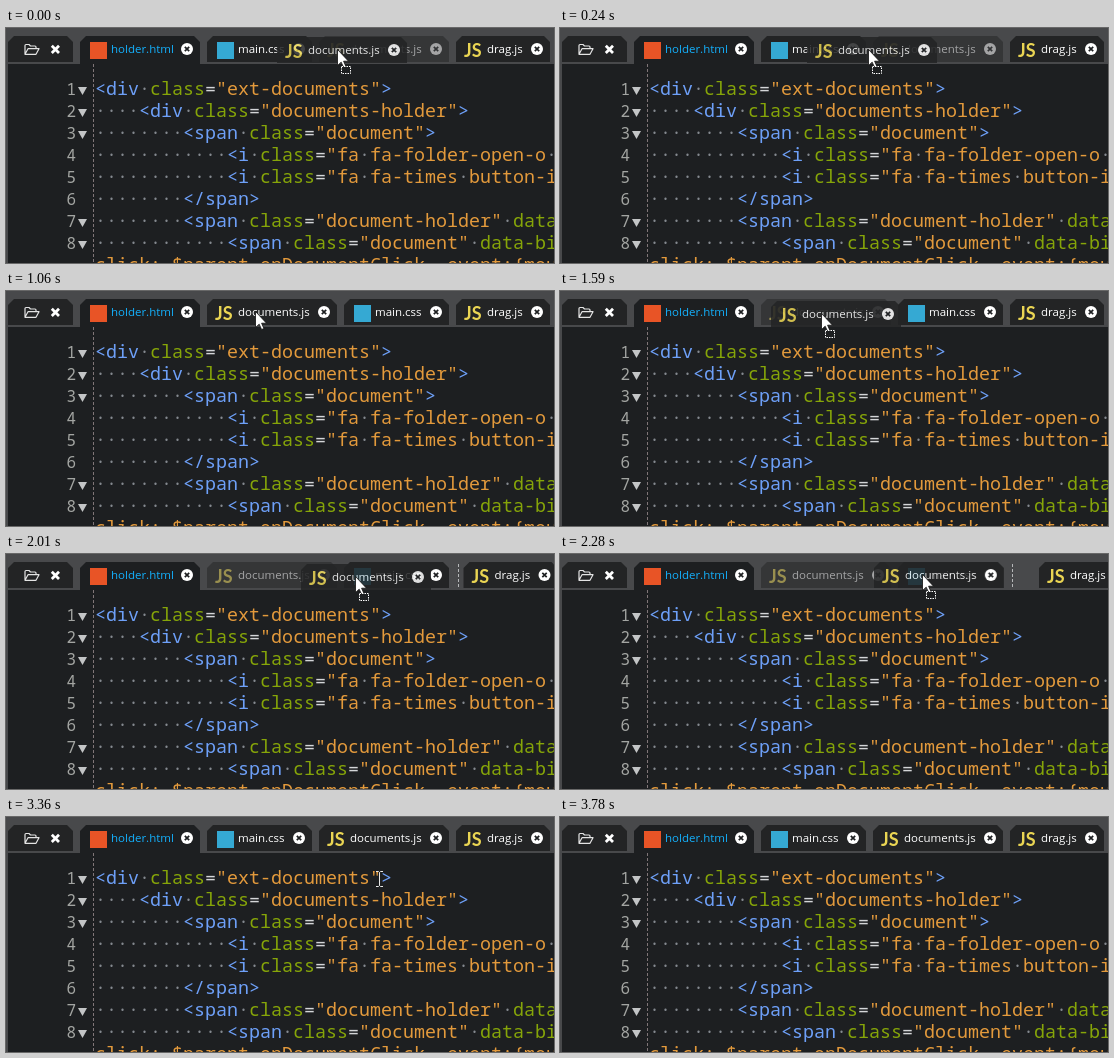
An HTML page for the animation above (4750 ms loop, 548 by 235 pixels).

```html
<!DOCTYPE html>
<html lang="en">
<head>
<meta charset="utf-8">
<title>Dragging editor tabs</title>
<style>
html, body { margin: 0; height: 100%; overflow: hidden; background: #1d1f21; }
svg { display: block; width: 100%; height: 100%; }
.tab text { font: 500 11.5px "Open Sans", sans-serif; fill: #fff; }
.tab .js { font: 700 18px Lato, sans-serif; fill: #ead553; }
.tab .active { fill: #14b0fc; }
.code { font: 18.333px "Noto Sans Mono", monospace; }
.num { font: 16px "Noto Sans Mono", monospace; fill: #a3a5a2; text-anchor: end; }
.tag { fill: #6ea0f8; }
.attr { fill: #86a509; }
.str { fill: #e39a3c; }
.op { fill: #d4d6d8; }
.dot { fill: #858a90; }
</style>
</head>
<body>
<svg viewBox="0 0 548 235">
  <rect width="548" height="235" fill="#48494b"/>
  <rect x="2" y="36" width="546" height="199" fill="#1d1f21"/>
  <path d="M2 34V14L8 8H61L67 14V34Z" fill="#232425"/>
  <path d="M19 26V17.5Q19 16.5 20 16.5H23L24.5 18H29Q30 18 30 19V20.5M19 26.3L22 20.7H33L30 26.3Z" fill="none" stroke="#e4e4e4" stroke-width="1.2" stroke-linejoin="round"/>
  <path d="M45.8 17.8L53 25M53 17.8L45.8 25" stroke="#fff" stroke-width="2.8"/>
  <g id="tabs"></g>
  <path d="M87.5 36V235" stroke="#807678" stroke-dasharray="3 2"/>
  <g id="code"></g>
  <g id="ghost" opacity=".85"></g>
  <g id="pointer">
    <path id="arrow" d="M.5 .5V16.5L4.2 13.2 6.6 18.5 8.9 17.5 6.6 12.2H11.5Z" fill="#fff" stroke="#111" stroke-width=".8"/>
    <rect id="badge" x="4.5" y="17.5" width="9" height="7" fill="#1d1f21" stroke="#fff" stroke-dasharray="1.5 1"/>
    <path id="beam" d="M0 .5H2.5L3.5 1.5 4.5 .5H7M3.5 1.5V14.5M0 15.5H2.5L3.5 14.5 4.5 15.5H7" fill="none" stroke="#e8e8e8"/>
  </g>
</svg>
<script>
const $ = id => document.getElementById(id);
const LOOP = 4750, TICK = 134;  // the screen refreshes once per tick
const SPACING = 7, GAP = 29, LAG = 0.3, LEAVE = 28;

// Pointer way points: [tick, x, y]
const path = [
  [-1, 354, 21], [3, 261, 20], [6, 261, 20], [8, 249, 20], [10, 249, 20], [12, 272, 23],
  [15, 349, 22], [17, 362, 20], [23, 362, 20], [25, 370, 54], [27, 455, 211], [LEAVE, 455, 211]
];
// Each drag: first and last tick, grab point in the tab, tick when the gap opens, tab pushed aside
const drags = [
  { start: 0, end: 6, grab: 67, open: 1, push: "css" },
  { start: 11, end: 21, grab: 46, open: 14, push: "drag" }
];

function pointerAt(k) {
  const i = Math.max(1, path.findIndex(p => p[0] >= k));
  const [k0, x0, y0] = path[i - 1], [k1, x1, y1] = path[i];
  const u = (k - k0) / (k1 - k0);
  return [x0 + (x1 - x0) * u, y0 + (y1 - y0) * u];
}

function smooth(u) {
  u = Math.min(1, Math.max(0, u));
  return u * u * (3 - 2 * u);
}

const tabs = {
  holder: { name: "holder.html", width: 120, color: "#e85426", active: true },
  css: { name: "main.css", width: 105, color: "#35a9d3" },
  docs: { name: "documents.js", width: 130 },
  drag: { name: "drag.js", width: 94 }
};

function tabMarkup({ name, width, color, active }) {
  const bottom = active ? 36 : 34, close = width - 13;
  const icon = color
    ? `<rect x="10" y="14" width="17" height="17" fill="${color}"/>`
    : `<text class="js" x="8" y="29">JS</text>`;
  return `<path d="M0 ${bottom}V14L6 8H${width - 6}L${width} 14V${bottom}Z" fill="${active ? "#1d1f21" : "#232425"}"/>
    ${icon}<text x="31" y="25" class="${active ? "active" : ""}">${name}</text>
    <circle cx="${close}" cy="21" r="6" fill="#fff"/>
    <path d="M${close - 2.2} 18.8l4.4 4.4m0-4.4l-4.4 4.4" stroke="#1d1f21" stroke-width="1.7"/>`;
}

$("tabs").innerHTML =
  '<path id="slot" d="M0 10V34" stroke="#b5b7b9" stroke-dasharray="3 2"/>' +
  Object.keys(tabs).map(id => `<g class="tab" id="${id}">${tabMarkup(tabs[id])}</g>`).join("");
$("ghost").innerHTML = `<g class="tab">${tabMarkup(tabs.docs)}</g>`;

const lines = [
  '<div class="ext-documents">',
  '    <div class="documents-holder">',
  '        <span class="document">',
  '            <i class="fa fa-folder-open-o button-icon"',
  '            <i class="fa fa-times button-icon"',
  '        </span>',
  '        <span class="document-holder" data-bind="',
  '            <span class="document" data-bind="'
];
const span = (kind, s) => `<tspan class="${kind}">${s.replace("<", "&lt;")}</tspan>`;
const dotted = s => s.replace(/ +/g, m => span("dot", "·".repeat(m.length)));

function highlight(line) {
  return line.replace(/"[^"]*"?|<\/?\w+|>|=|[\w-]+| +/g, s =>
    s[0] === '"' ? `<tspan class="str">${dotted(s)}</tspan>` :
    s[0] === " " ? dotted(s) :
    s === "=" ? span("op", s) :
    span(/[<>]/.test(s) ? "tag" : "attr", s));
}

$("code").innerHTML = lines.map((line, i) => {
  const y = 67 + 22 * i;
  const fold = /<(div|span)/.test(line) ? `<path d="M72 ${y - 8}h9l-4.5 8z" fill="#c3c5c6"/>` : "";
  return `<text class="num" x="70" y="${y}">${i + 1}</text>${fold}
    <text class="code" x="89" y="${y}">${highlight(line)}</text>`;
}).join("") +
  `<text class="code str" x="89" y="243">${dotted("click: $parent.onDocumentClick, event:{mousedown")}</text>`;

const move = (id, x, y = 0) => $(id).setAttribute("transform", `translate(${x} ${y})`);
const show = (id, on) => $(id).setAttribute("visibility", on ? "visible" : "hidden");

function draw(t) {
  const k = Math.floor((t + 16) / TICK);
  const drag = drags.find(d => k >= d.start && k < d.end);
  const gap = drag ? GAP * smooth((k - drag.open) / 3) : 0;
  const docsFirst = k >= drags[0].end && k < drags[1].end;
  const order = docsFirst ? ["holder", "docs", "css", "drag"] : ["holder", "css", "docs", "drag"];

  let x = 74;
  for (const id of order) {
    if (id === drag?.push) {
      move("slot", x + 2.5);
      x += gap;
    }
    move(id, x);
    x += tabs[id].width + SPACING;
  }
  show("slot", gap > 0);
  $("docs").setAttribute("opacity", drag ? 0.5 : 1);

  const visible = k < LEAVE;
  const [px, py] = visible ? pointerAt(k).map(Math.round) : [0, 0];
  const overText = py >= 40;
  move("pointer", px, py);
  show("arrow", visible && !overText);
  show("beam", visible && overText);
  show("badge", drag);
  show("ghost", drag);
  if (drag) move("ghost", Math.round(pointerAt(k - LAG)[0] - drag.grab), py - 20);
}

function frame(now) {
  draw(now % LOOP);
  requestAnimationFrame(frame);
}
draw(0);
requestAnimationFrame(frame);
</script>
</body>
</html>
```
